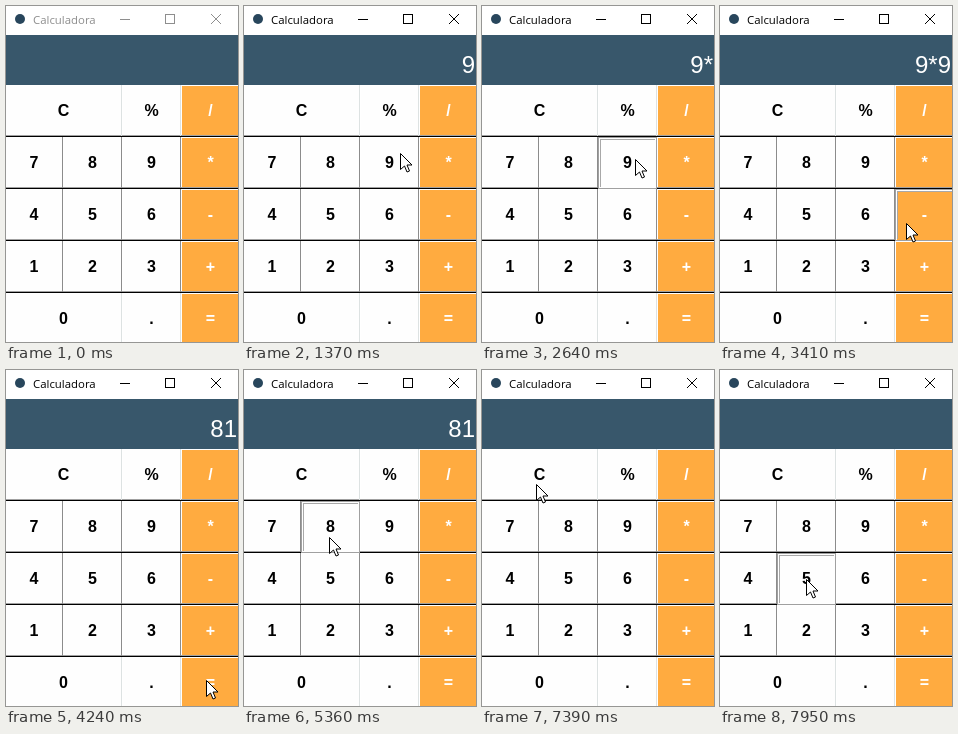
An HTML page with a canvas that plays this animation: 232x336 px, repeating every 8 s.

```html
<!DOCTYPE html>
<html lang="es">
<head>
<meta charset="utf-8">
<title>Calculadora</title>
<style>
html, body { margin: 0; width: 232px; height: 336px; overflow: hidden; background: #fff; }
canvas { display: block; }
</style>
</head>
<body>
<canvas id="stage" width="232" height="336"></canvas>
<script>
const ctx = document.getElementById('stage').getContext('2d');
const LOOP = 8000;
const SANS = '"Liberation Sans", Arial, sans-serif';
const edges = [-1, 57, 116, 175, 234];

// label, row, first column, column after the last
const buttons = [
  ['C', 0, 0, 2], ['%', 0, 2, 3], ['/', 0, 3, 4],
  ['7', 1, 0, 1], ['8', 1, 1, 2], ['9', 1, 2, 3], ['*', 1, 3, 4],
  ['4', 2, 0, 1], ['5', 2, 1, 2], ['6', 2, 2, 3], ['-', 2, 3, 4],
  ['1', 3, 0, 1], ['2', 3, 1, 2], ['3', 3, 2, 3], ['+', 3, 3, 4],
  ['0', 4, 0, 2], ['.', 4, 2, 3], ['=', 4, 3, 4]
].map(([label, row, a, b]) => ({
  label, x: edges[a], y: 79 + 52 * row, w: edges[b] - edges[a], h: 52,
  orange: a === 3, wide: b - a > 1 || label === '%' || label === '.'
}));

// pointer way points: time, x, y
const path = [
  [70, 222, 322], [340, 206, 212], [600, 178, 122], [840, 156, 147],
  [1370, 156, 147], [1940, 202, 159], [2150, 202, 159], [2640, 153, 153],
  [3060, 153, 153], [3230, 179, 168], [3760, 200, 311], [4235, 200, 311],
  [4500, 184, 280], [5010, 122, 256], [5360, 85, 167], [5840, 56, 119],
  [6050, 54, 114], [7390, 54, 114], [7500, 63, 130], [7950, 86, 209]
];

// press time, release time, display after release
const clicks = [
  [1170, 1300, '9'], [2010, 2080, '9*'], [2840, 2910, '9*9'],
  [3960, 4030, '81'], [6710, 6840, '']
];

function pointerAt(t) {
  const i = path.findIndex(p => p[0] > t);
  if (i < 0) return path[path.length - 1].slice(1);
  if (i === 0) return path[0].slice(1);
  const [t0, x0, y0] = path[i - 1], [t1, x1, y1] = path[i];
  const k = (t - t0) / (t1 - t0);
  return [Math.round(x0 + (x1 - x0) * k), Math.round(y0 + (y1 - y0) * k)];
}

function buttonAt([x, y]) {
  return buttons.find(b => x >= b.x && x < b.x + b.w && y >= b.y && y < b.y + b.h);
}

function rect(color, x, y, w, h) {
  ctx.fillStyle = color;
  ctx.fillRect(x, y, w, h);
}

function text(str, x, y, font, color, align) {
  ctx.font = font;
  ctx.fillStyle = color;
  ctx.textAlign = align;
  ctx.fillText(str, x, y);
}

function frame(color, x, y, w, h) {
  ctx.strokeStyle = color;
  ctx.lineWidth = 1;
  ctx.strokeRect(x + .5, y + .5, w - 1, h - 1);
}

function drawButton(b, sunken, pressed) {
  const { x, y, w, h, orange } = b;
  rect(orange ? '#ffab40' : '#fefefe', x, y, w, h);
  if (sunken) {
    frame('#fff', x + 1, y + 1, w - 1, h - 1);
    frame('#a0a0a0', x, y, w, h);
    rect('#a8a8a8', x + 2, y + 2, w - 4, 1);
    rect('#a8a8a8', x + 2, y + 2, 1, h - 4);
  } else {
    rect('#fff', x, y, w, 1);
    rect('#fff', x, y, 1, h);
    rect('#a0a0a0', x, y + h - 2, w, 1);
    rect(b.wide ? '#dde2e2' : '#8c8c8c', x + w - 1, y, 1, h);
    rect('#000', x, y + h - 1, w, 1);
  }
  const shift = pressed ? 1 : 0;
  text(b.label, x + w / 2 + shift, y + 31 + shift, 'bold 16px ' + SANS,
    orange ? '#fff' : '#000', 'center');
}

function drawTitle(active) {
  const color = active ? '#000' : '#8e8e8e';
  rect('#fff', 0, 0, 232, 29);
  ctx.fillStyle = '#28465c';
  ctx.beginPath();
  ctx.arc(14, 13, 5, 0, 7);
  ctx.fill();
  text('Calculadora', 27, 18, '11.4px "Open Sans", "Noto Sans", sans-serif', color, 'left');
  rect(color, 114, 13, 10, 1);
  frame(color, 159, 8, 10, 10);
  ctx.beginPath();
  ctx.moveTo(205, 8); ctx.lineTo(215, 18);
  ctx.moveTo(215, 8); ctx.lineTo(205, 18);
  ctx.stroke();
}

function drawPointer([x, y]) {
  ctx.save();
  ctx.translate(x + .5, y + .5);
  const arrow = new Path2D('M0 0V16L4 12.5L6.5 18.5L9 17.5L6.5 11.5H11.5Z');
  ctx.fillStyle = '#fff';
  ctx.strokeStyle = '#000';
  ctx.fill(arrow);
  ctx.stroke(arrow);
  ctx.restore();
}

function draw(t) {
  const pos = pointerAt(t);
  const hover = t >= 70 ? buttonAt(pos) : null;
  const pressed = clicks.some(([down, up]) => t >= down && t < up);
  // a released button stays raised until the pointer leaves it
  const released = clicks.some(([, up]) =>
    t >= up && t < up + 900 && buttonAt(pointerAt(up)) === hover);
  const last = clicks.filter(c => t >= c[1]).pop();

  drawTitle(t >= 1170);
  rect('#38576b', 0, 29, 232, 50);
  text(last ? last[2] : '', 231, 67, '24px ' + SANS, '#fff', 'right');
  for (const b of buttons) {
    const on = b === hover;
    drawButton(b, on && !released, on && pressed);
  }
  if (t >= 70) drawPointer(pos);
}

const start = performance.now();
function tick() {
  draw((performance.now() - start) % LOOP);
  requestAnimationFrame(tick);
}
tick();
</script>
</body>
</html>
```
